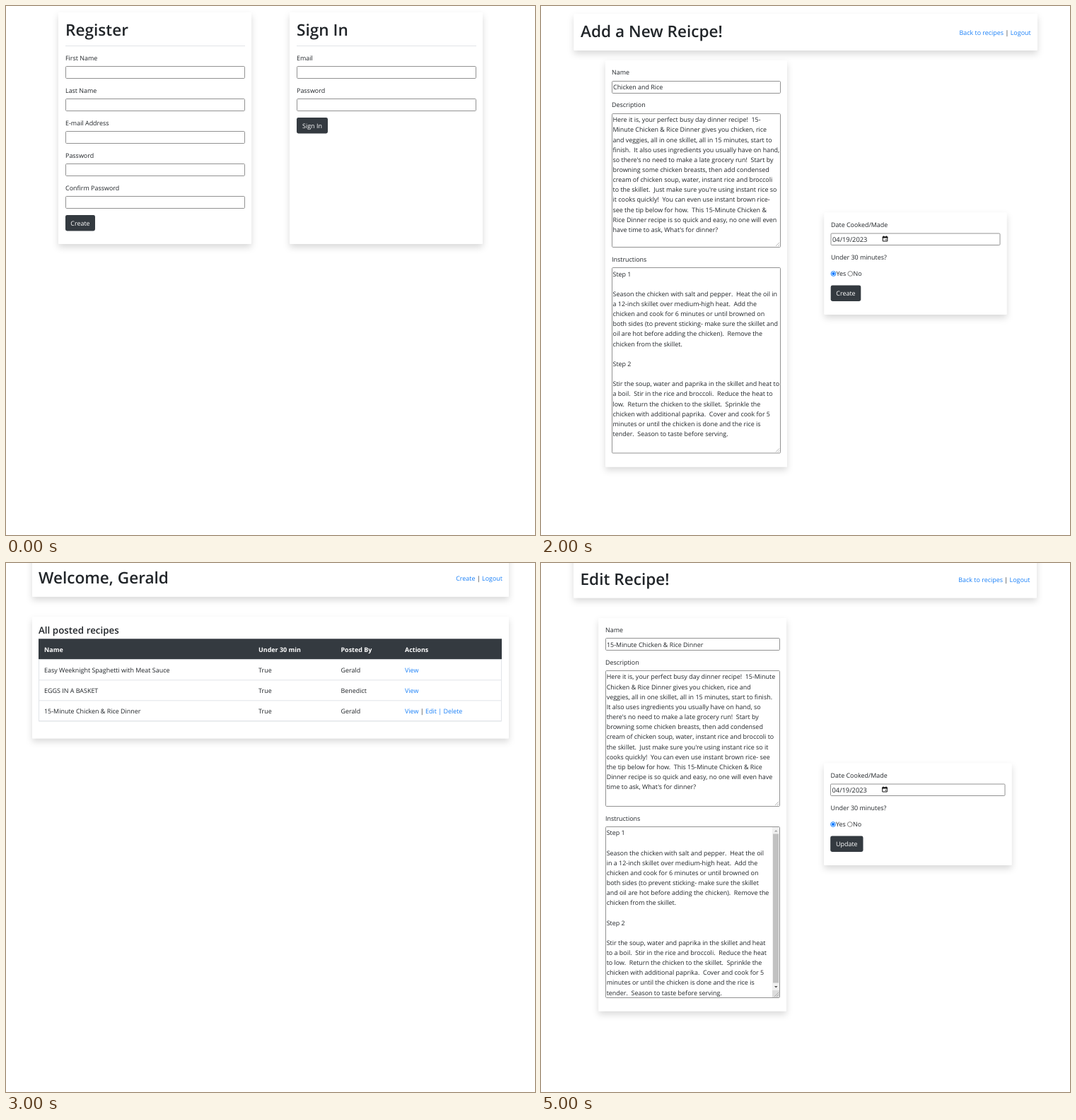
Write an HTML page that moves like this. It is 748 px wide and 749 px high and loops after 6 s.

```html
<!DOCTYPE html>
<html lang="en">
<head>
<meta charset="utf-8">
<title>Recipe app tour</title>
<style>
html, body { margin: 0; width: 100%; height: 100%; overflow: hidden; background: #fff; }
svg { display: block; width: 748px; height: 749px; }
text { font: 8.95px "Open Sans", "Noto Sans", sans-serif; fill: #212529; white-space: pre; text-rendering: geometricPrecision; }
.h1 { font-size: 22.6px; font-weight: 600; }
.h2 { font-size: 22.1px; font-weight: 600; }
.h3 { font-size: 15.5px; font-weight: 600; }
.h4 { font-size: 13.4px; font-weight: 600; }
.th { font-weight: 700; fill: #fff; }
.btn { fill: #fff; text-anchor: middle; }
.end { text-anchor: end; }
.date { font-size: 9.3px; }
.link { fill: #1a80f8; }
.card { fill: #fff; filter: url(#shadow); }
.field { fill: #fff; stroke: #929292; }
.dark { fill: #343a40; }
.rule { stroke: #e1e4e8; }
.grip { stroke: #999; stroke-width: .7; }
.scene { visibility: hidden; animation: show 6s step-end infinite; animation-delay: calc(var(--i) * 1s - 6s); }
@keyframes show {
  0% { visibility: visible; }
  16.66667%, 100% { visibility: hidden; }
}
</style>
</head>
<body>
<svg id="stage" viewBox="0 0 748 749"></svg>
<script>
const text = (x, y, s, cls = "") => `<text x="${x}" y="${y}" class="${cls}">${s.replace(/&/g, "&amp;")}</text>`;
const rect = (x, y, x2, y2, cls, r = 0) =>
  `<rect x="${x}" y="${y}" width="${x2 - x}" height="${y2 - y}" rx="${r}" class="${cls}"/>`;
const card = (x, y, x2, y2) => rect(x, y, x2, y2, "card", 1.5);
const field = (x, y, x2, y2) => rect(x + .5, y + .5, x2 - .5, y2 - .5, "field", 1.2);
const rule = (x, x2, y) => `<path d="M${x} ${y}H${x2}" class="rule"/>`;
const link = s => `<tspan class="link">${s}</tspan>`;
const lines = (x, y, step, s) => s.split("\n").map((t, i) => text(x, y + i * step, t)).join("");
const button = (x, y, x2, label) => rect(x, y, x2, y + 22.5, "dark", 2.4) + text((x + x2) / 2, y + 14.6, label, "btn");
const area = (x, y, x2, y2) => field(x, y, x2, y2) +
  `<path class="grip" d="M${x2 - 7} ${y2 - 2}l5 -5M${x2 - 4} ${y2 - 2}l2 -2"/>`;

const header = (x, y, x2, y2, title, tx, ty, nav, navX, navY) => card(x, y, x2, y2) +
  text(tx, ty, title, "h1") + text(navX, navY, link(nav) + " | " + link("Logout"), "end");

const form = (x, title, labels, action, x2) => card(x, 9, x + 273, 337) +
  text(x + 10, 42, title, "h1") + rule(x + 10, x + 264, 56.5) +
  labels.map((s, i) => text(x + 10, 76.7 + 46 * i, s) + field(x + 10, 85 + 46 * i, x + 264, 103 + 46 * i)).join("") +
  button(x + 10, 66 + 46 * labels.length, x2, action);

const table = (x, x2, y, cols, rows) => {
  const bottom = y + 29.5 + rows.length * 29;
  const heads = ["Name", "Under 30 min", "Posted By", "Actions"];
  return text(x, y - 7.7, "All posted recipes", "h4") +
    `<path class="rule" fill="none" d="M${x + .5} ${y}V${bottom}H${x2 - .5}V${y}"/>` +
    rect(x, y, x2, y + 29, "dark") + rule(x, x2, y + 29.5) +
    heads.map((s, i) => text(cols[i], y + 18.4, s, "th")).join("") +
    rows.map((row, r) => rule(x, x2, y + 29.5 + 29 * (r + 1)) +
      row.map((s, i) => text(cols[i], y + 47.9 + 29 * r, s)).join("")).join("");
};

const radio = (x, y, on) => `<circle cx="${x}" cy="${y}" r="3.4" fill="#fff" stroke="${on ? "#0075ff" : "#767676"}" stroke-width=".9"/>` +
  (on ? `<circle cx="${x}" cy="${y}" r="2.1" fill="#0075ff"/>` : "");

const calendar = (x, y) => `<path fill="none" stroke="#111" d="M${x + .5} ${y + 1.5}h6.5v6h-6.5z"/>
  <path fill="#111" d="M${x} ${y + 1}h7.5v2h-7.5zM${x + 1.2} ${y}h1v1h-1zM${x + 5.2} ${y}h1v1h-1zM${x + 4.3} ${y + 4.8}h1.3v1.3h-1.3z"/>`;

const details = (x, y, x2, action, buttonX2) => card(x, y, x2, y + 144.5) +
  text(x + 9.5, y + 20.4, "Date Cooked/Made") + field(x + 9, y + 29, x2 - 9, y + 46.5) +
  text(x + 11.5, y + 41.2, "04/19/2023", "date") + calendar(x + 82.3, y + 33) +
  text(x + 9.5, y + 66.6, "Under 30 minutes?") +
  radio(x + 13, y + 86.5, true) + text(x + 17, y + 89.8, "Yes") +
  radio(x + 36.8, y + 86.5, false) + text(x + 41, y + 89.8, "No") +
  button(x + 9.2, y + 103, buttonX2, action);

const scrollbar = (x, y, x2, y2) => `<path fill="#f1f1f1" d="M${x} ${y}H${x2}V${y2}H${x}z"/>
  <path fill="#c1c1c1" d="M${x + 1} ${y + 9.5}H${x2 - 1}V${y2 - 20.5}H${x + 1}z"/>
  <path fill="#a3a3a3" d="M${x + 3} ${y + 6.5}h4.5l-2.25 -2.5z"/>
  <path fill="#505050" d="M${x + 3} ${y2 - 16}h4.5l-2.25 2.5z"/>
  <path fill="#dcdcdc" d="M${x} ${y2 - 10}H${x2}V${y2}H${x}z"/>
  <path class="grip" d="M${x2 - 7} ${y2 - 1}l6 -6M${x2 - 4} ${y2 - 1}l3 -3"/>`;

const user = "Gerald";
const dinner = "15-Minute Chicken & Rice Dinner";
const recipes = [
  ["Easy Weeknight Spaghetti with Meat Sauce", "True", user, link("View")],
  ["EGGS IN A BASKET", "True", "Benedict", link("View")],
  [dinner, "True", user, link("View") + " | " + link("Edit | Delete")]
];

const register = form(74, "Register",
    ["First Name", "Last Name", "E-mail Address", "Password", "Confirm Password"], "Create", 126) +
  form(401, "Sign In", ["Email", "Password"], "Sign In", 455);

const list = header(38, -20, 709, 50.5, "Welcome, " + user, 47, 31.5, "Create", 700, 28.2) +
  card(38, 79, 709, 221.5) + table(47, 700, 110, [55, 392, 522, 623], recipes.slice(0, 2));

const create = header(46.5, 11, 702, 63, "Add a New Reicpe!", 56, 44.3, "Back to recipes", 692.7, 41) +
  card(91, 77, 348, 652.5) +
  text(100, 97.4, "Name") + field(100, 106, 339, 124) + text(102, 118.2, "Chicken and Rice") +
  text(100, 143.4, "Description") + area(100, 152, 339, 342) +
  lines(101.5, 164.2, 14.15, `Here it is, your perfect busy day dinner recipe!  15-
Minute Chicken & Rice Dinner gives you chicken, rice
and veggies, all in one skillet, all in 15 minutes, start to
finish.  It also uses ingredients you usually have on hand,
so there's no need to make a late grocery run!  Start by
browning some chicken breasts, then add condensed
cream of chicken soup, water, instant rice and broccoli
to the skillet.  Just make sure you're using instant rice so
it cooks quickly!  You can even use instant brown rice-
see the tip below for how.  This 15-Minute Chicken &
Rice Dinner recipe is so quick and easy, no one will even
have time to ask, What's for dinner?`) +
  text(100, 361.8, "Instructions") + area(100, 370, 339, 633.5) +
  lines(101.5, 382.5, 14.16, `Step 1

Season the chicken with salt and pepper.  Heat the oil in
a 12-inch skillet over medium-high heat.  Add the
chicken and cook for 6 minutes or until browned on
both sides (to prevent sticking- make sure the skillet and
oil are hot before adding the chicken).  Remove the
chicken from the skillet.

Step 2

Stir the soup, water and paprika in the skillet and heat to
a boil.  Stir in the rice and broccoli.  Reduce the heat to
low.  Return the chicken to the skillet.  Sprinkle the
chicken with additional paprika.  Cover and cook for 5
minutes or until the chicken is done and the rice is
tender.  Season to taste before serving.`) +
  details(400.5, 292.5, 658.5, "Create", 452.3);

const longList = header(37, -20, 711, 47.8, "Welcome, " + user, 46, 28.8, "Create", 702, 25.4) +
  card(37, 76, 711, 248.3) + table(46, 701, 107.3, [54, 357, 473.5, 564], recipes);

const view = header(39, -20, 711, 50, "Welcome, " + user, 48.5, 31.2, "Back to recipes", 701.7, 27.7) +
  card(39, 78.5, 711, 382.5) +
  text(56.5, 111.2, dinner, "h2") + text(692.5, 108.3, "Posted by: " + user, "h3 end") +
  [121.5, 206.5, 249.5, 335.5].map(y => rule(48, 702, y)).join("") +
  text(55.5, 139.2, "Description") +
  lines(124, 139.2, 14.13, `Here it is, your perfect busy day dinner recipe! 15-Minute Chicken & Rice Dinner gives you chicken, rice and veggies, all in one skillet, all
in 15 minutes, start to finish. It also uses ingredients you usually have on hand, so there's no need to make a late grocery run! Start by
browning some chicken breasts, then add condensed cream of chicken soup, water, instant rice and broccoli to the skillet. Just make sure
you're using instant rice so it cooks quickly! You can even use instant brown rice- see the tip below for how. This 15-Minute Chicken &
Rice Dinner recipe is so quick and easy, no one will even have time to ask, What's for dinner?`) +
  lines(55.5, 224.7, 14.13, "Under 30\nMinutes?") + text(124, 224.7, "True") +
  text(55.5, 267.7, "Instructions") +
  lines(124, 267.7, 14.13, `Step 1 Season the chicken with salt and pepper. Heat the oil in a 12-inch skillet over medium-high heat. Add the chicken and cook for 6
minutes or until browned on both sides (to prevent sticking- make sure the skillet and oil are hot before adding the chicken). Remove the
chicken from the skillet. Step 2 Stir the soup, water and paprika in the skillet and heat to a boil. Stir in the rice and broccoli. Reduce the
heat to low. Return the chicken to the skillet. Sprinkle the chicken with additional paprika. Cover and cook for 5 minutes or until the
chicken is done and the rice is tender. Season to taste before serving.`) +
  text(55.5, 353.1, "Date Made:") + text(124, 353.1, "2023-04-19 00:00:00");

const edit = header(46, -20, 701, 49.3, "Edit Recipe!", 55.5, 30.8, "Back to recipes", 691.5, 27.2) +
  card(81.5, 78, 347, 634.5) +
  text(91, 97.8, "Name") + field(91, 106, 338, 124) + text(93, 118.5, dinner) +
  text(91, 143.8, "Description") + area(91, 152, 338, 345) +
  lines(92.7, 164.4, 14.17, `Here it is, your perfect busy day dinner recipe!  15-Minute
Chicken & Rice Dinner gives you chicken, rice and
veggies, all in one skillet, all in 15 minutes, start to finish.
It also uses ingredients you usually have on hand, so
there's no need to make a late grocery run!  Start by
browning some chicken breasts, then add condensed
cream of chicken soup, water, instant rice and broccoli to
the skillet.  Just make sure you're using instant rice so it
cooks quickly!  You can even use instant brown rice- see
the tip below for how.  This 15-Minute Chicken & Rice
Dinner recipe is so quick and easy, no one will even have
time to ask, What's for dinner?`) +
  text(91, 364.6, "Instructions") + field(91, 373, 338, 616) + scrollbar(327, 374, 337, 615) +
  lines(92.7, 385.2, 14.15, `Step 1

Season the chicken with salt and pepper.  Heat the oil
in a 12-inch skillet over medium-high heat.  Add the
chicken and cook for 6 minutes or until browned on
both sides (to prevent sticking- make sure the skillet
and oil are hot before adding the chicken).  Remove the
chicken from the skillet.

Step 2

Stir the soup, water and paprika in the skillet and heat
to a boil.  Stir in the rice and broccoli.  Reduce the heat
to low.  Return the chicken to the skillet.  Sprinkle the
chicken with additional paprika.  Cover and cook for 5
minutes or until the chicken is done and the rice is
tender.  Season to taste before serving.`) +
  details(400, 283.5, 665.5, "Update", 455.5);

document.getElementById("stage").innerHTML =
  `<filter id="shadow" filterUnits="userSpaceOnUse" x="-20" y="-60" width="800" height="820">
    <feDropShadow dx="0" dy="4.7" stdDeviation="4.7" flood-color="#000" flood-opacity=".15"/></filter>` +
  [register, list, create, longList, view, edit]
    .map((scene, i) => `<g class="scene" style="--i:${i}">${scene}</g>`).join("");
</script>
</body>
</html>
```
